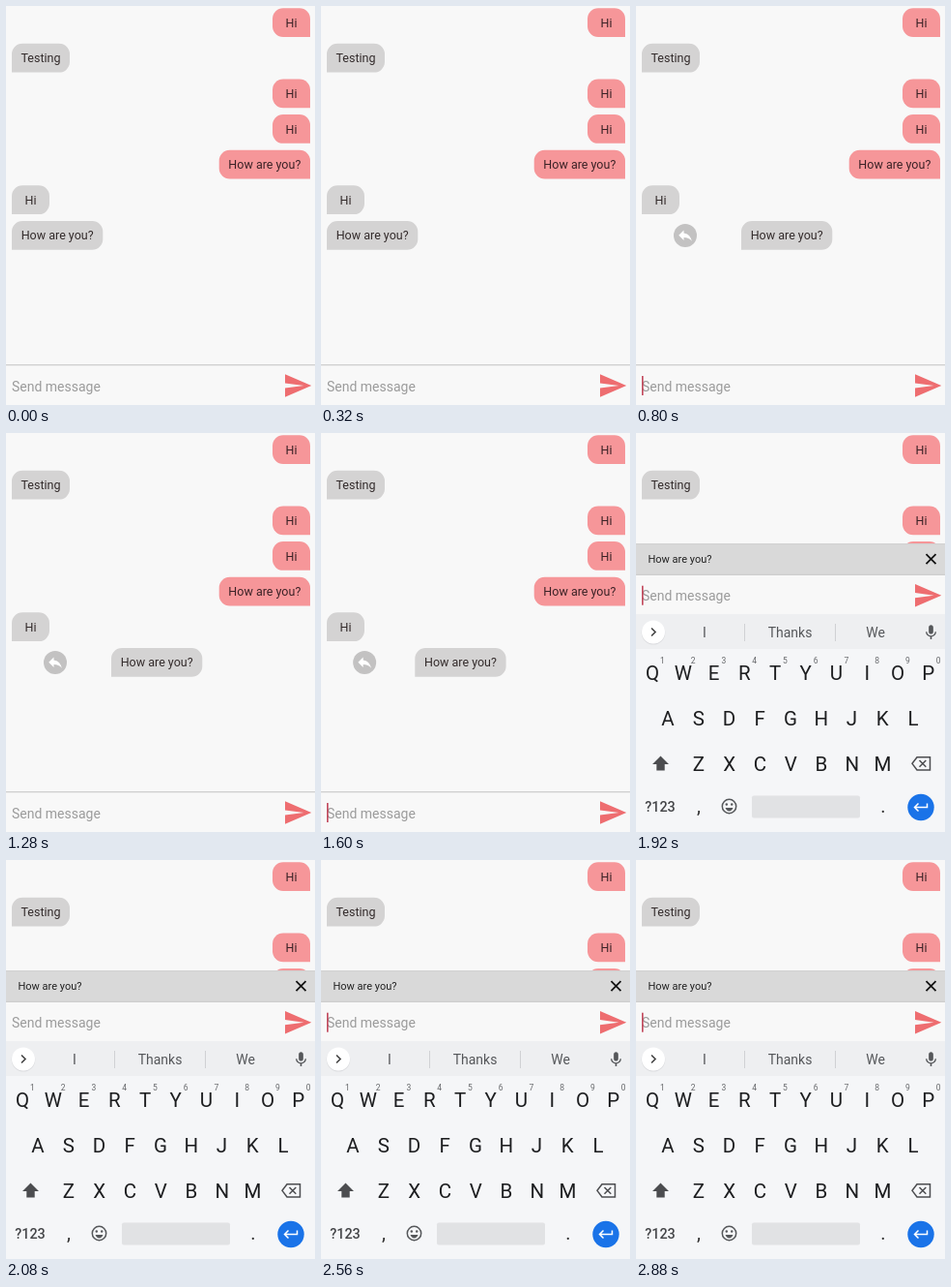
Animation of 320x412 px, one loop 3.04 s. Source, as an HTML page:

```html
<!DOCTYPE html>
<html lang="en">
<head>
<meta charset="utf-8">
<title>Swipe to reply</title>
<style>
  html, body { margin: 0; height: 100%; overflow: hidden; background: #f8f8f8; }
  svg { display: block; width: 100vw; height: 100vh; font-family: Roboto, sans-serif; }
  .mid { text-anchor: middle; }
  .line { fill: none; stroke-linecap: butt; }
</style>
</head>
<body>
<svg id="stage" viewBox="0 0 320 412"></svg>
<script>
const LOOP = 3040, STEP = 160;
const SWIPE = 103;

const text = (s, x, y, size, fill, extra = 'class="mid"') =>
  `<text x="${x}" y="${y}" font-size="${size}" fill="${fill}" ${extra}>${s}</text>`;
const icon = (d, x, y, scale, fill) =>
  `<path d="${d}" fill="${fill}" transform="translate(${x} ${y}) scale(${scale}) translate(-12 -12)"/>`;
const line = (d, color, width) =>
  `<path class="line" d="${d}" stroke="${color}" stroke-width="${width}"/>`;
const rect = (x, y, w, h, fill, rx = 0) =>
  `<rect x="${x}" y="${y}" width="${w}" height="${h}" rx="${rx}" fill="${fill}"/>`;

// Rounded bubble with one square corner at the bottom on the sender's side
function bubble(label, row, mine) {
  const w = { Hi: 39, Testing: 60 }[label] || 94.3;
  const x = mine ? 315 - w : 6, y = 2.2 + row * 36.62, h = 29.8, r = 11;
  const right = mine ? `v${h - r}h${r - w}a${r} ${r} 0 0 1 ${-r} ${-r}`
                     : `v${h - 2 * r}a${r} ${r} 0 0 1 ${-r} ${r}h${r - w}`;
  return `<path d="M${x} ${y + r}a${r} ${r} 0 0 1 ${r} ${-r}h${w - 2 * r}a${r} ${r} 0 0 1 ${r} ${r}${right}z"
    fill="${mine ? '#f69699' : '#d4d3d3'}"/>` +
    text(label, x + w / 2, y + 19.5, 12.5, mine ? '#3b2226' : '#332b2b');
}

function keyRow(keys, x, y) {
  return [...keys].map((k, i) => text(k, x + i * 31.75, y, 20.5, '#1d1e20')).join('');
}

function keyboard() {
  const hints = [...'1234567890'].map((n, i) =>
    text(n, 27.3 + i * 31.75, 238, 8.5, '#66686b')).join('');
  return rect(0, 187, 320, 225, '#f5f6f8') + rect(0, 187, 320, 36, '#eeeff1') +
    '<circle cx="18" cy="206.3" r="12.3" fill="#dcdde0"/><circle cx="18" cy="205.5" r="12" fill="#fff"/>' +
    line('M16 201.5l4 4-4 4', '#444', 1.6) +
    text('I', 71, 211, 14, '#55575a') + text('Thanks', 159.5, 211, 14, '#55575a') +
    text('We', 248, 211, 14, '#55575a') +
    line('M112.5 197v18M206.5 197v18', '#d0d1d4', 1) +
    icon('M12 14c1.7 0 3-1.3 3-3V5c0-1.7-1.3-3-3-3S9 3.300 9 5v6c0 1.700 1.300 3 3 3zm5.300-3c0 3-2.500 5.100-5.300 5.100S6.700 14 6.700 11H5c0 3.400 2.700 6.200 6 6.700V21h2v-3.300c3.300-.5 6-3.300 6-6.700z',
      305.5, 206, .78, '#55575a') +
    keyRow('QWERTYUIOP', 17, 255.2) + hints +
    keyRow('ASDFGHJKL', 33, 302) + keyRow('ZXCVBNM', 65, 348.800) +
    '<path d="M25.500 333.500l8.500 8.500h-4.300v6.500h-8.400v-6.500h-4.300z" fill="#4c4d50"/>' +
    line('M291 334.700h13.500v13.300h-13.500l-5-6.650zM293.500 338l6.800 6.800M300.300 338l-6.800 6.800', '#4c4d50', 1.5) +
    text('?123', 25, 391.300, 14.400, '#444548', 'class="mid" font-weight="500"') +
    text(',', 65, 391.500, 20, '#333') + text('.', 256, 391.500, 20, '#333') +
    '<circle cx="96.500" cy="385.500" r="7.200" fill="none" stroke="#55575a" stroke-width="1.500"/>' +
    '<circle cx="93.800" cy="383.500" r="1.200" fill="#55575a"/><circle cx="99.200" cy="383.500" r="1.200" fill="#55575a"/>' +
    '<path d="M92.500 387h8q-1.300 3.400-4 3.400t-4-3.400z" fill="#55575a"/>' +
    rect(120, 374.500, 112, 23, '#e1e2e4', 2) +
    '<circle cx="295" cy="386.500" r="13.700" fill="#1a73e8"/>' +
    line('M301.500 382.500v4h-12.500M292.500 382.500l-4 4 4 4', '#fff', 1.500);
}

const chat = [['Hi', 1], ['Testing', 0], ['Hi', 1], ['Hi', 1], ['How are you?', 1], ['Hi', 0]];

stage.innerHTML = rect(0, 0, 320, 412, '#f8f8f8') +
  chat.map(([label, mine], i) => bubble(label, i, mine)).join('') +
  `<g id="swiped">${bubble('How are you?', 6, 0)}</g>
  <g id="reply"><circle r="12" fill="#c3c2c2"/>
    ${icon('M10 9V5l-7 7 7 7v-4.100c5 0 8.500 1.600 11 5.100-1-5-4-10-11-11z', 0, -.3, .75, '#fff')}</g>
  <g id="composer">
    ${rect(0, 371, 320, 41, '#f8f8f8') + rect(0, 370, 320, 1.300, '#cfcfcf')}
    <g id="quote">
      ${rect(0, 338.500, 320, 32.500, '#d9d9d9') + rect(0, 338.500, 320, 1, '#d0d0d0') + rect(0, 370, 320, 1, '#cccccc')}
      ${text('How are you?', 12.500, 358.800, 11, '#222', '')}
      ${line('M300.500 349.500l10 10M310.500 349.500l-10 10', '#111', 1.800)}
    </g>
    ${text('Send message', 6, 397.500, 14, '#9b9b9b', '')}
    ${rect(6, 382, 1.600, 20, '#c2475a').replace('<rect', '<rect id="caret"')}
    ${icon('M2 21L23 12 2 3v7l15 2-15 2z', 302, 392, 1.300, '#ee6d70')}
  </g>
  <g id="keys">${keyboard()}</g>`;

const [swiped, reply, composer, quote, caret, keys] =
  ['swiped', 'reply', 'composer', 'quote', 'caret', 'keys'].map(id => document.getElementById(id));

const ramp = (t, start, length) => Math.min(1, Math.max(0, (t - start) / length));
const smooth = p => p * p * (3 - 2 * p);
const show = (el, on) => el.setAttribute('visibility', on ? 'visible' : 'hidden');

function draw(t) {
  const dx = SWIPE * (smooth(ramp(t, 400, 360)) - smooth(ramp(t, 1540, 286)));
  const typing = t >= 1920;
  swiped.setAttribute('transform', `translate(${dx} 0)`);
  reply.setAttribute('transform', `translate(${dx / 2 - .5} 237) scale(${ramp(t, 500, 180)})`);
  show(reply, dx > 0);
  show(quote, t >= 1760);
  show(keys, typing);
  composer.setAttribute('transform', `translate(0 ${typing ? -224.300 : 0})`);
  show(caret, t >= 640 && Math.floor((t - 640) / 480) % 2 === 0);
}

const began = performance.now();
function tick() {
  const t = (performance.now() - began) % LOOP;
  draw(Math.floor(t / STEP) * STEP);
  requestAnimationFrame(tick);
}
tick();
</script>
</body>
</html>
```
